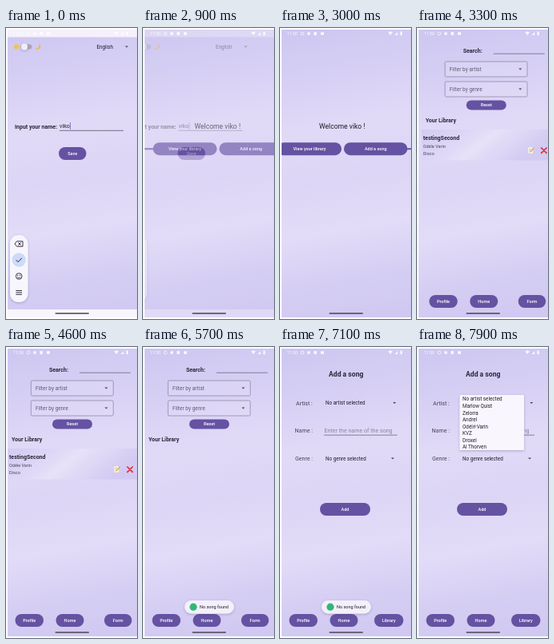
Recreate the animation shown at these times as an HTML page. Size 164 px wide and 364 px high, loop 8 s.

```html
<!DOCTYPE html>
<html lang="en">
<head>
<meta charset="utf-8">
<title>Music library app</title>
<style>
html, body { margin: 0; height: 100%; overflow: hidden; background: #fff; }
svg { display: block; width: 100vw; height: 100vh; font-family: Roboto, "Open Sans", sans-serif; }
</style>
</head>
<body>
<svg id="stage" viewBox="0 0 164 364"></svg>
<script>
const INK = '#1f1b2b', GREY = '#494458', PURPLE = '#6552a2';
const LOOP = 8000, SHIFT = 38, SLIDE = 450;
const USER = 'viko', SINGER = 'Odéle Varin';
const ARTISTS = ['No artist selected', 'Marlow Quist', 'Zelorra', 'Andrel', SINGER, 'KVZ', 'Droxel', 'Al Thorven'];

// Drawing helpers; text y is the middle of the line
const text = (x, y, s, size = 6.3, fill = INK, more = '') =>
  `<text x="${x}" y="${y + size * .36}" font-size="${size}" fill="${fill}" ${more}>${s}</text>`;
const bold = (x, y, s, size = 7) => text(x, y, s, size, '#2c273a', 'font-weight="700"');
const rect = (x, y, w, h, r, fill, more = '') =>
  `<rect x="${x}" y="${y}" width="${w}" height="${h}" rx="${r}" fill="${fill}" ${more}/>`;
const line = (d, color = INK, width = 1, more = '') =>
  `<path d="${d}" fill="none" stroke="${color}" stroke-width="${width}" ${more}/>`;
const dot = (x, y, r, fill, more = '') => `<circle cx="${x}" cy="${y}" r="${r}" fill="${fill}" ${more}/>`;
const arrow = (x, y) => `<path d="M${x - 2} ${y - 1}h4l-2 2z" fill="${GREY}"/>`;
const button = (x, y, w, label, h = 16) => rect(x, y - h / 2, w, h, h / 2, PURPLE) +
  text(x + w / 2, y, label, 5.5, '#fff', 'text-anchor="middle" font-weight="500"');
const filter = (y, label) =>
  rect(31.3, y - 9.5, 103, 19, 1.6, '#ffffff18', 'stroke="#77718a" stroke-width=".6"') +
  text(37, y, label, 6.3, '#5d566e', 'letter-spacing=".1"') + arrow(125.5, y);
const footer = (last, x, w) => button(11.5, 342, 35.5, 'Profile') + button(62.5, 342, 35, 'Home') + button(x, 342, w, last);

const toolbar = rect(5, 259, 22.5, 84, 11, '#f7f6fc', 'filter="url(#soft)"') +
  line('M13.5 266.8h7.5v6.4h-7.5l-2.6-3.2zM15.3 268.4l3.4 3.2m0-3.2l-3.4 3.2', INK, .9) +
  dot(16.2, 290, 8.7, '#cddafa') + line('M12.7 290.2l2.4 2.5 4.8-5', INK, 1) +
  dot(16.2, 310.5, 3.8, 'none', `stroke="${INK}" stroke-width=".9"`) +
  dot(14.8, 309.4, .6, INK) + dot(17.6, 309.4, .6, INK) + line('M14.2 311.6q2 2.2 4 0', INK, .8) +
  line('M12.4 328.5h7.6m-7.6 2.4h7.6m-7.6 2.4h7.6', INK, .9);

const namePage = dot(13, 23.5, 3, '#f8c43a') +
  rect(18.5, 20.5, 14, 6, 3, '#aaa6b4') + dot(23, 23.5, 4, '#f1eef6', 'filter="url(#soft)"') +
  '<path d="M41.5 19.5a4 4 0 1 1 -5 6.2a4.6 4.6 0 0 0 5 -6.2z" fill="#f4b92f"/>' +
  text(113.5, 23.5, 'English') + arrow(151, 23.5) +
  bold(11, 123, 'Input your name:') + text(67, 122.5, USER, 7.1) +
  line('M80.5 118v9', PURPLE, .7) + line('M67 128.3h80', GREY, .7) +
  button(66, 157, 34.5, 'Save') + toolbar;

const welcomePage = text(49, 123.3, `Welcome ${USER} !`, 8.6) +
  line('M-60 151.2h60M157 151.2h80', PURPLE, 2) +
  button(-3, 151.2, 80, 'View your library') + button(80, 151.2, 79.5, 'Add a song');

const song = rect(2, 127, 162, 38.5, 0, 'url(#row)') + bold(4, 137, 'testingSecond') +
  text(4, 148.5, SINGER, 5.5, GREY) + text(4, 157.5, 'Disco', 5.5, GREY) +
  rect(135, 149, 6.5, 8, .5, '#f6f4ef', 'stroke="#c9c2b5" stroke-width=".4"') +
  line('M136.3 151.5h3.5m-3.5 1.8h3m-3 1.8h2', '#8ba0b5', .5) + line('M138.3 154.8l4.3-5', '#eda22f', 1.3) +
  line('M152 150l6.4 6.4m0-6.4l-6.4 6.4', '#df2d41', 1.7, 'stroke-linecap="round"');

const libraryPage = bold(54, 28, 'Search:') + line('M92 32.2h64', GREY, .6) +
  filter(51.5, 'Filter by artist') + filter(76.5, 'Filter by genre') +
  button(58, 96.5, 50, 'Reset', 12) + bold(7, 115, 'Your Library') +
  `<g id="song">${song}</g>` + footer('Form', 123, 34.5);

const formPage = bold(61, 33.5, 'Add a song', 8.6) +
  text(20, 70, 'Artist :', 7.1, GREY) + text(57, 70, ARTISTS[0]) + arrow(143.3, 70) +
  text(18.5, 104.7, 'Name :', 7.1, GREY) + text(55.5, 104.7, 'Enter the name of the song', 7.1, '#8c859f') +
  line('M55 110.2h92', GREY, .6) +
  text(19, 139.5, 'Genre :', 7.1, GREY) + text(57, 139.5, 'No genre selected') + arrow(141, 139.5) +
  button(50, 203, 63, 'Add') + footer('Library', 118, 36.5);

const popup = rect(53.5, 60, 80.5, 69, 1.5, '#faf6fd', 'filter="url(#soft)"') +
  ARTISTS.map((a, i) => text(57, 65.2 + i * 8.53, a)).join('');
const toast = rect(52, 317, 62, 16.5, 8.2, '#f4f0fa', 'filter="url(#soft)"') +
  dot(63, 325.2, 4.6, '#2fb878') + text(71, 325.2, 'No song found', 5.5);

const status = text(8.5, 7, '11:50', 5.5, '#fff') +
  dot(28, 7, 1.9, 'none', 'stroke="#fff" stroke-width=".8"') + dot(36, 7, 1.9, '#fff') +
  rect(42.5, 5, 3.4, 4, .5, '#fff') + rect(51, 5.2, 4, 3.6, .5, '#fff') +
  '<path d="M135.5 5.5q2.7-2 5.4 0l-2.7 3.6zM143.5 9l3.8-4v4z" fill="#fff"/>' + rect(150.5, 4.6, 2.4, 4.6, .5, '#fff');

const bars = rect(2, 2, 162, 9.5, 0, '#f5f0fb') + rect(2, 352, 162, 10, 0, '#f8f5fc');
const pages = [namePage, welcomePage, libraryPage, formPage];
const starts = [-SLIDE, 815, 3130, 6402];

stage.innerHTML = `<defs>
  <linearGradient id="bg" gradientUnits="userSpaceOnUse" x1="60" y1="0" x2="125" y2="364">
    <stop stop-color="#cec7f1"/><stop offset=".2" stop-color="#d9d2f5"/><stop offset=".34" stop-color="#e1daf7"/>
    <stop offset=".5" stop-color="#dcd5f5"/><stop offset=".68" stop-color="#e2dcf8"/>
    <stop offset=".85" stop-color="#d5cef3"/><stop offset="1" stop-color="#d0c8f1"/>
  </linearGradient>
  <linearGradient id="row" x2="1" y2=".3">
    <stop stop-color="#d3cbf2"/><stop offset=".35" stop-color="#ded7f6"/>
    <stop offset=".55" stop-color="#e7e1f9"/><stop offset="1" stop-color="#d2caf1"/>
  </linearGradient>
  <filter id="soft" x="-60%" y="-30%" width="220%" height="160%">
    <feDropShadow dx="0" dy="1" stdDeviation="1.8" flood-color="#3a3060" flood-opacity=".3"/>
  </filter>
  <clipPath id="screen"><rect x="2" y="2" width="162" height="360"/></clipPath>
</defs><g clip-path="url(#screen)">` +
  pages.map((p, i) => `<g class="page">${rect(2, 2, 162, 360, 0, 'url(#bg)')}${i ? '' : bars}<g>${p}</g></g>`).join('') +
  `<g id="popup">${popup}</g><g id="tap">${dot(72.3, 99.3, 2.5, '#8d8a98', 'fill-opacity=".45" stroke="#fff" stroke-width=".5"')}</g>
  <g id="toast">${toast}</g><g opacity=".85">${status}</g>${rect(61.5, 356.2, 42.5, 1.6, .8, '#49444f')}</g>`;

const pageEls = [...document.querySelectorAll('.page')];
const get = id => document.getElementById(id);
const ramp = (t, from, len) => Math.min(1, Math.max(0, (t - from) / len));
const cubic = (a, b, c, d, u) => {
  const v = 1 - u;
  return a * v * v * v + 3 * b * v * v * u + 3 * c * v * u * u + d * u * u * u;
};

// Two joined curves: a quick start with a very slow finish
function ease(t) {
  const [xs, ys] = t < 1 / 6 ? [[0, .05, .1333, 1 / 6], [0, 0, .06, .4]]
                             : [[1 / 6, .2083, .25, 1], [.4, .82, 1, 1]];
  let lo = 0, hi = 1;
  for (let i = 0; i < 24; i++) {
    const mid = (lo + hi) / 2;
    if (cubic(...xs, mid) < t) lo = mid; else hi = mid;
  }
  return cubic(...ys, lo);
}

function draw(t) {
  const progress = i => i < starts.length ? ease(ramp(t, starts[i], SLIDE)) : 0;
  pageEls.forEach((el, i) => {
    const next = starts[i + 1] ?? Infinity;
    el.style.display = t >= starts[i] && t < next + SLIDE ? '' : 'none';
    el.setAttribute('opacity', ramp(t, starts[i] + 35, 83));
    const x = SHIFT * (1 - progress(i) - progress(i + 1));
    el.lastElementChild.setAttribute('transform', `translate(${x} 0)`);
  });
  get('song').style.display = t < 5200 ? '' : 'none';
  const shown = ramp(t, 5300, 300) * (1 - ramp(t, 7150, 250));
  get('toast').setAttribute('opacity', shown);
  get('toast').setAttribute('transform', `translate(0 ${(1 - shown) * 6})`);
  get('popup').setAttribute('opacity', ramp(t, 7200, 180));
  get('tap').setAttribute('opacity', t >= 7600 ? 1 : 0);
}

function tick() {
  draw(performance.now() % LOOP);
  requestAnimationFrame(tick);
}
tick();
</script>
</body>
</html>
```
